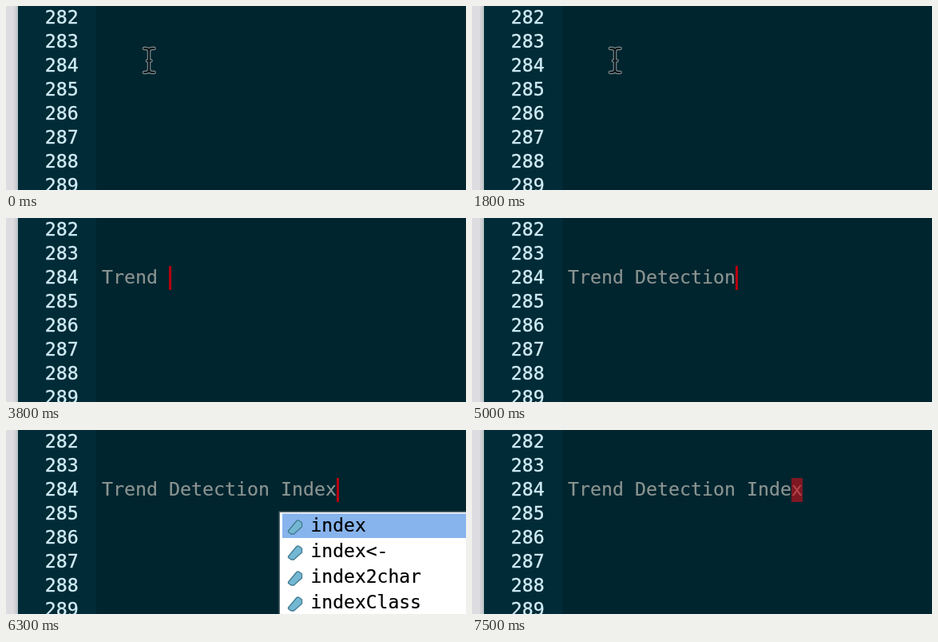
Recreate the animation shown at these times as an HTML page. Size 576 px wide and 230 px high, loop 8 s.

```html
<!DOCTYPE html>
<html lang="en">
<head>
<meta charset="utf-8">
<title>Editor typing</title>
<style>
  html, body { margin: 0; width: 100%; height: 100%; overflow: hidden; background: #00252f; }
  svg { display: block; width: 576px; height: 230px; }
  text { font: 23.25px "DejaVu Sans Mono", Menlo, monospace; white-space: pre; }
  #numbers text { fill: #d0edf7; stroke: #d0edf7; stroke-width: .35; }
  #line { fill: #8b9491; stroke: #8b9491; stroke-width: .2; }
  #popup text { font-size: 23px; fill: #000; stroke: #000; stroke-width: .2; }
</style>
</head>
<body>
<svg viewBox="0 0 576 230">
  <rect width="576" height="230" fill="#00252f"/>
  <rect width="113" height="230" fill="#012b37"/>
  <rect width="15" height="230" fill="#dddce1"/>
  <rect x="10" width="3" height="230" fill="#d0d1d5"/>
  <rect x="13" width="2" height="230" fill="#bcc5ca"/>
  <g id="numbers"></g>
  <text id="line" x="120" y="82"></text>
  <rect id="block" y="60" width="14" height="30" fill="#d30f1c" fill-opacity=".6"/>
  <rect id="bar" y="60" width="3" height="30" fill="#b8000f"/>
  <g id="pointer" fill="none" stroke-linecap="round" stroke-linejoin="round">
    <path id="beam" stroke="#7d898c" stroke-width="4.6"
      d="M173 53H175Q179 53 179 57V79Q179 83 175 83H173M185.500 53H183Q179 53 179 57M179 79Q179 83 183 83H185.500M177 68.500H181.500"/>
    <use href="#beam"/>
  </g>
  <g id="popup">
    <rect x="341.500" y="101.500" width="240" height="140" fill="#55666c"/>
    <rect x="343" y="103" width="240" height="140" fill="#fff"/>
    <rect x="346" y="104.500" width="240" height="30.500" fill="#87b4ed"/>
  </g>
</svg>
<script>
const LOOP = 8000, CHAR = 14, LEFT = 120;
const $ = id => document.getElementById(id);
const phrase = "Trend Detection Index";

// When each character of the phrase is typed, in ms.
const typedAt = [3200, 3300, 3400, 3500, 3600, 3800, 4000, 4200, 4400, 4400, 4600,
  4800, 4900, 4900, 5000, 5200, 5300, 5400, 5500, 5800, 6000];

function add(parent, tag, attrs, content = "") {
  const node = document.createElementNS("http://www.w3.org/2000/svg", tag);
  for (const key in attrs) node.setAttribute(key, attrs[key]);
  node.textContent = content;
  parent.appendChild(node);
  return node;
}

for (let i = 0; i < 8; i++) add($("numbers"), "text", { x: 48.7, y: 22 + 30 * i }, 282 + i);

["index", "index<-", "index2char", "indexClass"].forEach((label, i) => {
  const y = 127 + 32 * i;
  add($("popup"), "path", {
    d: `M353.500 ${y - 1}L364 ${y - 13.5}Q365 ${y - 14.5} 366.500 ${y - 14}L370.500 ${y - 11}V${y - 6}L360.500 ${y + 3}H357L353.500 ${y + .5}Z`,
    fill: "#73b7d3", stroke: "#437b91", "stroke-width": 1.3, "stroke-linejoin": "round"
  });
  add($("popup"), "text", { x: 381.5, y }, label);
});

// Dark core over the grey outline of the pointer.
const core = $("beam").cloneNode();
core.removeAttribute("id");
core.setAttribute("stroke", "#071317");
core.setAttribute("stroke-width", 2.2);
$("pointer").querySelector("use").replaceWith(core);

const within = (t, from, to) => t >= from && t < to;
const show = (id, on) => $(id).setAttribute("visibility", on ? "visible" : "hidden");

function render(t) {
  const count = typedAt.filter(at => at <= t).length;
  const end = LEFT + CHAR * count;
  $("line").textContent = phrase.slice(0, count);

  show("pointer", t < 2800);
  show("popup", within(t, 6300, 6600));

  show("bar", within(t, 2900, 6600) || within(t, 7000, 7300));
  $("bar").setAttribute("x", end);

  show("block", within(t, 1200, 1700) || within(t, 2200, 2800) || t >= 7300);
  $("block").setAttribute("x", t >= 7400 ? end - CHAR : end);
}

const start = performance.now();
function tick() {
  render((performance.now() - start) % LOOP);
  requestAnimationFrame(tick);
}
tick();
</script>
</body>
</html>
```
